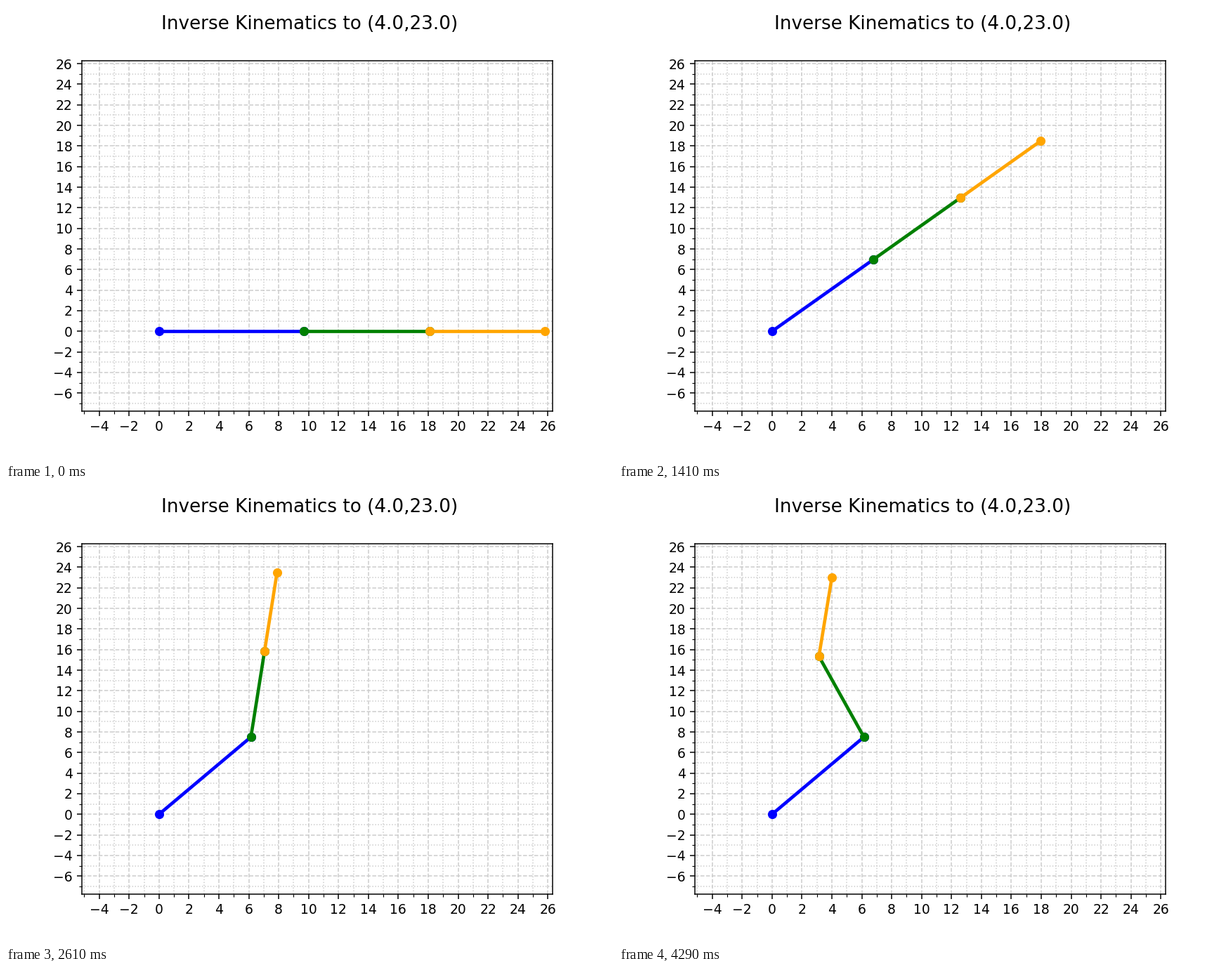
These frames come from a looping animation (864x648 px, 4320 ms). A matplotlib script:

```python
import numpy as np
import matplotlib.pyplot as plt
from matplotlib.animation import FuncAnimation
from matplotlib.ticker import MultipleLocator

LINKS = np.array([9.7, 8.4, 7.7])
COLORS = ["blue", "green", "orange"]
TARGET = (4.0, 23.0)
SHOULDER = np.radians(50.7)
STEPS_PER_RAD = 60
INTERVAL = 30


def solve_joints(target, shoulder):
    """Relative joint angles that reach the target with a fixed first angle."""
    l1, l2, l3 = LINKS
    dx = target[0] - l1 * np.cos(shoulder)
    dy = target[1] - l1 * np.sin(shoulder)
    d = np.hypot(dx, dy)
    bend = np.arccos((l2**2 + d**2 - l3**2) / (2 * l2 * d))
    upper = np.arctan2(dy, dx) + bend
    ex = dx - l2 * np.cos(upper)
    ey = dy - l2 * np.sin(upper)
    return np.array([shoulder, upper - shoulder, np.arctan2(ey, ex) - upper])


JOINTS = solve_joints(TARGET, SHOULDER)
COUNTS = (np.abs(JOINTS) * STEPS_PER_RAD).astype(int)
STARTS = np.cumsum(COUNTS) - COUNTS


def arm_points(i):
    # joints turn one after another, each at constant speed
    progress = np.clip((i - STARTS) / (COUNTS - 1), 0, 1)
    angles = np.cumsum(JOINTS * progress)
    x = np.concatenate([[0], np.cumsum(LINKS * np.cos(angles))])
    y = np.concatenate([[0], np.cumsum(LINKS * np.sin(angles))])
    return x, y


plt.rcParams["font.family"] = "DejaVu Sans"
fig, ax = plt.subplots(figsize=(6.4, 4.8), dpi=135)
fig.suptitle(f"Inverse Kinematics to ({TARGET[0]},{TARGET[1]})", fontsize=14)

reach = LINKS.sum()
ax.set_xlim(-0.2 * reach, reach + 0.5)
ax.set_ylim(-0.3 * reach, reach + 0.5)
for axis in (ax.xaxis, ax.yaxis):
    axis.set_major_locator(MultipleLocator(2))
    axis.set_minor_locator(MultipleLocator(1))
ax.grid(which="major", color="#CCCCCC", linestyle="--")
ax.grid(which="minor", color="#CCCCCC", linestyle=":")

arms = [ax.plot([], [], "o-", color=c, lw=2.5, markersize=6)[0] for c in COLORS]


def update(i):
    x, y = arm_points(i)
    for k, arm in enumerate(arms):
        arm.set_data(x[k:k + 2], y[k:k + 2])
    return arms


anim = FuncAnimation(fig, update, frames=int(COUNTS.sum()), interval=INTERVAL,
                     repeat=True, repeat_delay=0)
plt.show()
```
